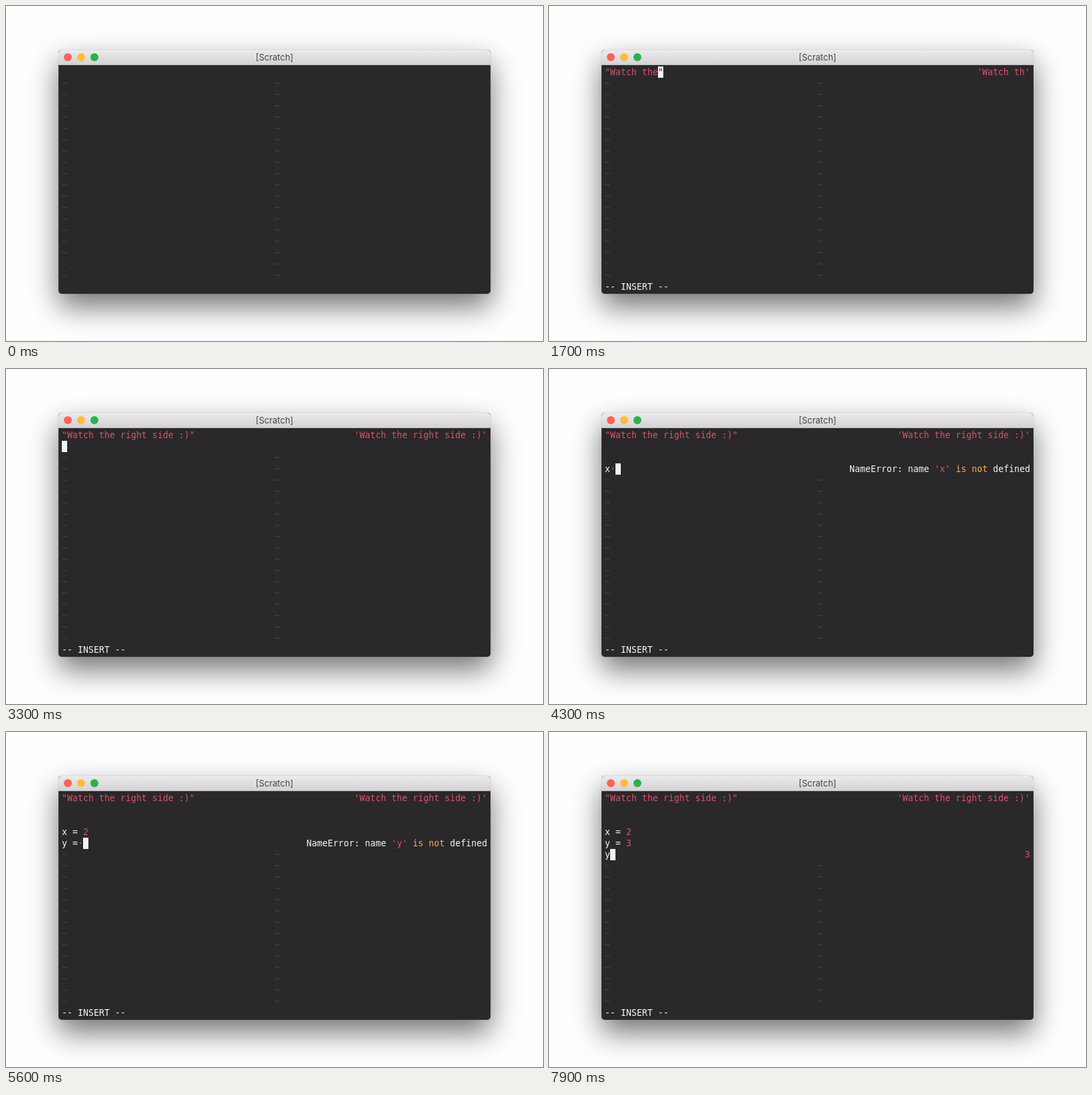
Recreate the animation shown at these times as an HTML page. Size 808 px wide and 504 px high, loop 8000 ms.

```html
<!DOCTYPE html>
<html lang="en">
<head>
<meta charset="utf-8">
<style>
html, body { margin: 0; width: 100%; height: 100%; overflow: hidden; background: #fefdff; }
.window {
  position: absolute; left: 79px; top: 66px; width: 650px; height: 367px;
  border-radius: 5px; background: #2a282a;
  box-shadow: 0 0 1px rgba(0,0,0,.5), 0 19px 44px rgba(0,0,0,.55);
}
.bar {
  height: 22px; border-radius: 5px 5px 0 0; border-bottom: 1px solid #bcbabc;
  background: linear-gradient(#eceaec, #d4d2d4);
  font: 13px/23px Inter, "Open Sans", sans-serif; color: #454345; text-align: center;
}
.bar i { position: absolute; top: 5px; width: 12px; height: 12px; border-radius: 50%; }
pre {
  position: absolute; top: 25px; margin: 0; color: #f8f6f8;
  font: 13.29px/17px "DejaVu Sans Mono", monospace;
}
#left { left: 5px; }
#right { left: 325px; }
#cursor { width: 8px; height: 17px; background: #f3f1f3; color: #2a282a; }
.red { color: #d9536a; }
.gold { color: #f6b042; }
.dim { color: #454345; }
.dot { color: #8a8078; }
</style>
</head>
<body>
<div class="window">
  <div class="bar">
    <i style="left:8px;background:#ff6259"></i>
    <i style="left:28px;background:#fdbd3a"></i>
    <i style="left:48px;background:#28b34b"></i>
    [Scratch]
  </div>
  <pre id="left"></pre>
  <pre id="right"></pre>
  <pre id="cursor"></pre>
</div>
<script>
const LOOP = 8000, ROWS = 19, COLS = 40;
const INSERT_AT = 460, TYPE_AT = 920, KEY_MS = 75, LAG = 50, LEAVE_QUOTE = 2970;
const phrase = '"Watch the right side :)';

// [time, key]; '<' is backspace
const keys = [
  [3270, '\n'], [3470, '\n'], [3670, '\n'],
  [4070, 'x'], [4270, ' '], [4370, '='], [4470, ' '], [4670, '2'],
  [4870, '\n'], [5070, 'y'], [5270, ' '], [5370, '='], [5470, ' '], [5670, '3'],
  [6070, '\n'], [6470, 'x'], [6970, '<'], [7070, 'y']
];
const nameError = v => `NameError: name '${v}' is not defined`;
// [time, row, result]
const results = [
  [4170, 3, nameError('x')], [4770, 3, ''],
  [5170, 4, nameError('y')], [5770, 4, ''],
  [6570, 5, '2'], [7020, 5, ''], [7170, 5, '3']
];

const el = id => document.getElementById(id);
const typed = t => phrase.slice(0, Math.max(0, Math.floor((t - TYPE_AT) / KEY_MS)));
const span = (cls, s) => `<span class="${cls}">${s}</span>`;

function paint(line) {
  return line.replace(/"[^"]*"|'[^']*'|\d|\b(?:is|not)\b|\S $|^~| *~$/g, s =>
    s.includes('~') ? span('dim', s)
    : /^[in]/.test(s) ? span('gold', s)
    : s.length == 2 && s[1] == ' ' ? s[0] + span('dot', '·')
    : span('red', s));
}

function show(id, html) {
  const node = el(id);
  if (node.last !== html) node.innerHTML = node.last = html;
}

function draw(t) {
  const text = typed(t);
  let body = '';
  for (const [at, key] of keys)
    if (t >= at) body = key == '<' ? body.slice(0, -1) : body + key;
  const lines = ((text && text + '"') + body).split('\n');

  const output = lines.map(() => '');
  const echo = typed(t - LAG);
  if (echo) output[0] = "'" + echo.slice(1) + "'";
  for (const [at, row, result] of results)
    if (t >= at) output[row] = result;

  const left = [], right = [];
  for (let r = 0; r < ROWS; r++) {
    const used = r < lines.length;
    left.push(paint(used ? lines[r] : '~'));
    right.push(used ? ' '.repeat(COLS - output[r].length) + paint(output[r]) : paint('~'));
  }
  const inserting = t >= INSERT_AT;
  if (inserting) left.push('-- INSERT --');
  show('left', left.join('\n'));
  show('right', right.join('\n'));

  const row = lines.length - 1;
  const inQuote = text && t < LEAVE_QUOTE;
  const col = inQuote ? text.length : lines[row].length;
  const cursor = el('cursor');
  cursor.style.display = inserting ? 'block' : 'none';
  cursor.style.left = 5 + col * 8 + 'px';
  cursor.style.top = 25 + row * 17 + 'px';
  show('cursor', inQuote ? '"' : '');
}

let start;
function tick(now) {
  start ??= now;
  draw((now - start) % LOOP);
  requestAnimationFrame(tick);
}
requestAnimationFrame(tick);
</script>
</body>
</html>
```
